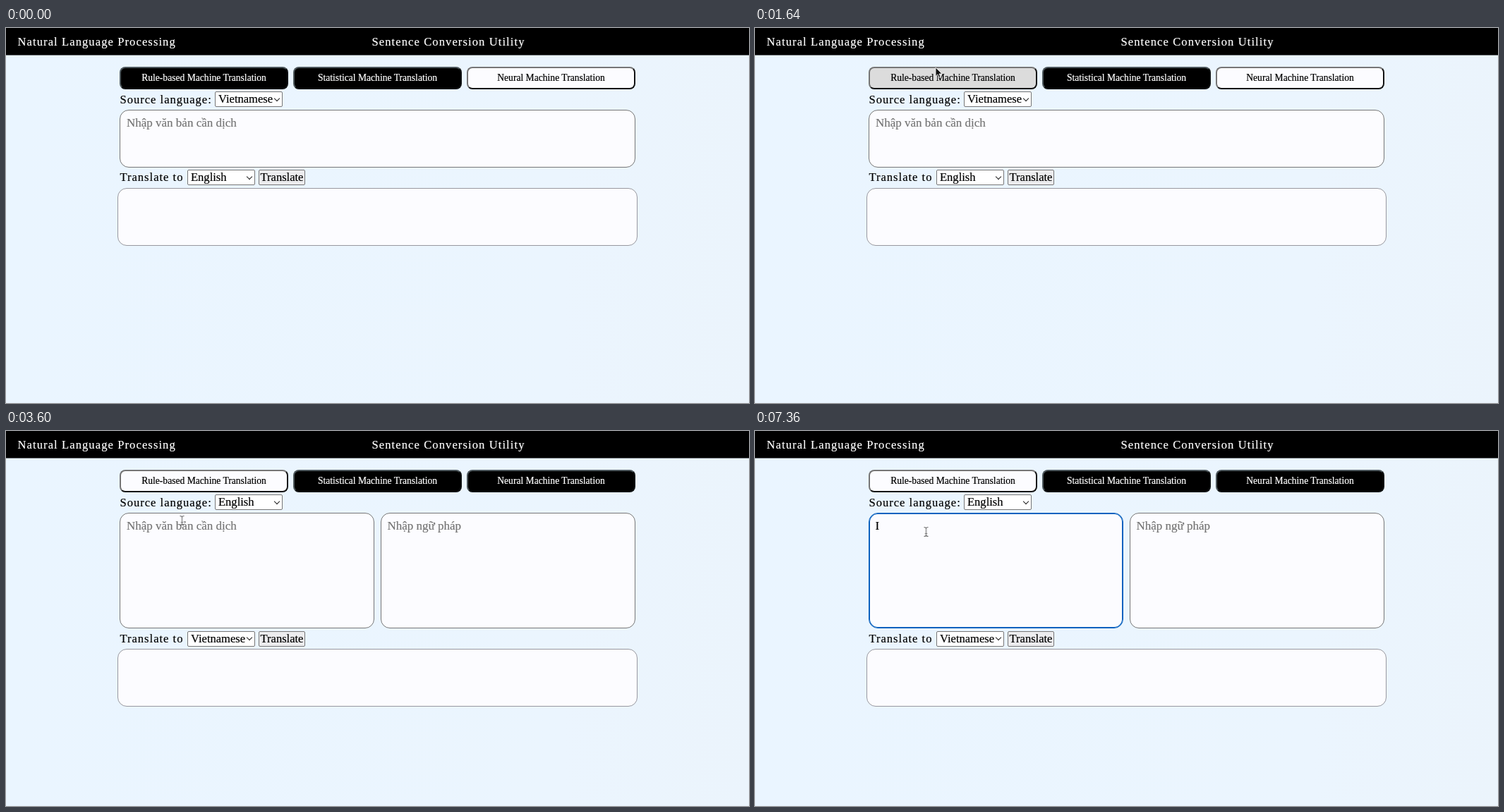
These frames come from a looping animation (1053 by 532 pixels, 8 s). An HTML page:

```html
<!DOCTYPE html>
<html lang="en">
<head>
<meta charset="utf-8">
<title>Translation page</title>
<style>
  html, body { margin: 0; width: 100%; height: 100%; overflow: hidden; }
  body {
    position: relative;
    background: linear-gradient(90deg, #eaf5ff, #ebf5fe 75%, #ebf4fc);
    font: 16.55px/22px "Liberation Serif", serif;
    color: #000;
    -webkit-text-stroke: .2px;
  }
  body *, svg { box-sizing: border-box; white-space: pre; }
  header, .tab, .label, .select, .button, .area, .output, .caret, .typed, .cursor { position: absolute; }
  .view { position: absolute; inset: 0; }

  header {
    left: 0; top: 0; width: 100%; height: 39px;
    border-bottom: 1px solid #6c7074;
    background: #000; color: #fff; letter-spacing: 1.1px;
  }
  header span { position: absolute; top: 8.5px; }

  .tab {
    --lit: #4c565b; --shade: #101213;
    top: 55px; width: 239px; height: 32px;
    border: 2px solid; border-color: var(--lit) var(--shade) var(--shade) var(--lit); border-radius: 8px;
    background: #000; color: #fff;
    font-size: 13.6px; line-height: 28px; text-align: center;
  }

  .label { left: 161.5px; letter-spacing: 1px; }
  .select, .button { height: 22px; border: 1px solid #767676; border-radius: 2px; line-height: 20px; }
  .select { width: 96px; padding-left: 4px; background: #fff; }
  .select::after {
    content: ""; position: absolute; right: 4px; top: 5.5px; width: 5px; height: 5px;
    border: solid #222; border-width: 0 1.2px 1.2px 0; transform: rotate(45deg);
  }
  .source { left: 296px; top: 90px; }
  .goal { left: 257px; }
  .button { left: 358px; width: 66px; background: #ececee; text-align: center; }

  .area, .output { border: 1px solid #767676; border-radius: 13px; background: #fcfcff; }
  .area { left: 161px; top: 115.5px; width: 731px; height: 82px; padding: 7px 9px; color: #757575; font-size: 17px; }
  .half { width: 361px; height: 164px; }
  .right { left: 530.5px; }
  .output { left: 158px; width: 737px; height: 82px; border-color: #98989f; }

  .neural .low { top: 201px; }
  .neural .output { top: 226.5px; }
  .rule .low { top: 283.5px; }
  .rule .output { top: 309px; }

  .typed { left: 170.5px; top: 123.5px; font-size: 17px; }
  .caret { left: 0; top: 124px; width: 1px; height: 20px; background: #000; }
  .cursor { left: 0; top: 0; width: 1px; height: 1px; overflow: visible; }

  .neural, .rule, .first, .third, .focusable, .hint, .typed, .caret, .cursor, .arrow, .beam {
    animation: 8s step-end infinite;
  }
  .neural { animation-name: leave; }
  .rule { animation-name: enter; }
  .first { animation-name: choose; }
  .third { animation-name: release; }
  .focusable { animation-name: focus; }
  .hint { animation-name: hint; }
  .typed { animation-name: typed; }
  .caret { animation-name: caret; }
  .cursor { animation-name: move; }
  .arrow { animation-name: arrow; }
  .beam { animation-name: beam; }

  @keyframes leave { 0% { visibility: visible } 32.75%, 100% { visibility: hidden } }
  @keyframes enter { 0% { visibility: hidden } 32.75%, 100% { visibility: visible } }
  @keyframes choose {
    0% { background: #000; color: #fff; --lit: #4c565b; --shade: #101213 }
    20.5% { background: #dcdcdc; color: #000; --lit: #767676; --shade: #141414 }
    29.5% { background: #dcdcdc; color: #000; --lit: #141414; --shade: #767676 }
    32.75%, 100% { background: #fcfcff; color: #000; --lit: #767676; --shade: #141414 }
  }
  @keyframes release {
    0% { background: #fcfcff; color: #000; --lit: #767676; --shade: #141414 }
    32.75%, 100% { background: #000; color: #fff; --lit: #4c565b; --shade: #101213 }
  }
  @keyframes focus {
    0% { border-color: #767676; box-shadow: none }
    50.5%, 100% { border-color: #0b62bf; box-shadow: inset 0 0 0 1px #0b62bf }
  }
  @keyframes hint { 0% { opacity: 1 } 69.5%, 100% { opacity: 0 } }
  @keyframes typed { 0% { opacity: 0 } 69.5%, 100% { opacity: 1 } }
  @keyframes caret {
    0% { opacity: 0; transform: translateX(171px) }
    50.5% { opacity: 1; transform: translateX(171px) }
    67.75% { opacity: 0; transform: translateX(171px) }
    69.5% { opacity: 1; transform: translateX(177px) }
    74.5% { opacity: 1; transform: translateX(181px) }
    92%, 100% { opacity: 0; transform: translateX(181px) }
  }
  @keyframes move {
    0% { transform: translate(295px, -40px) }
    11.75% { transform: translate(289px, -14px) }
    17.25% { transform: translate(283px, 2px) }
    18.75% { transform: translate(270px, 24px) }
    20.5% { transform: translate(256px, 56px) }
    21.5% { transform: translate(248px, 62px) }
    22.25% { transform: translate(244px, 65px) }
    25.5% { transform: translate(243px, 65px) }
    39.5% { transform: translate(244px, 68px) }
    40.5% { transform: translate(245px, 74px) }
    41.5% { transform: translate(246px, 83px) }
    42.5% { transform: translate(247px, 94px) }
    43.25% { transform: translate(248px, 103px) }
    44% { transform: translate(249px, 115px) }
    45% { transform: translate(249.5px, 127px) }
    46.5% { transform: translate(247px, 133px) }
    47.5% { transform: translate(244px, 139px) }
    48.75%, 100% { transform: translate(242.5px, 143px) }
  }
  @keyframes arrow { 0% { opacity: 1 } 42.5%, 100% { opacity: 0 } }
  @keyframes beam { 0% { opacity: 0 } 42.5%, 100% { opacity: 1 } }
</style>
</head>
<body>
  <header>
    <span style="left:16.5px">Natural Language Processing</span>
    <span style="left:518.5px">Sentence Conversion Utility</span>
  </header>

  <div class="tab first" style="left:161px">Rule-based Machine Translation</div>
  <div class="tab" style="left:407px">Statistical Machine Translation</div>
  <div class="tab third" style="left:653px">Neural Machine Translation</div>
  <div class="label" style="top:90.5px">Source language:</div>

  <div class="view neural">
    <div class="select source">Vietnamese</div>
    <div class="area">Nhập văn bản cần dịch</div>
    <div class="label low">Translate to</div>
    <div class="select goal low">English</div>
    <div class="button low">Translate</div>
    <div class="output"></div>
  </div>

  <div class="view rule">
    <div class="select source">English</div>
    <div class="area half focusable"><span class="hint">Nhập văn bản cần dịch</span></div>
    <div class="area half right">Nhập ngữ pháp</div>
    <div class="label low">Translate to</div>
    <div class="select goal low">Vietnamese</div>
    <div class="button low">Translate</div>
    <div class="output"></div>
    <div class="typed">I</div>
    <div class="caret"></div>
  </div>

  <svg class="cursor">
    <path class="arrow" d="M0 0V12.5L2.9 9.8L4.8 14.2L7 13.3L5.1 9H9Z" fill="#111" stroke="#eee" stroke-width=".9"/>
    <path class="beam" d="M-3-6.5Q0-6.5 0-4.5Q0-6.5 3-6.5M0-4.5V4.5M-3 6.5Q0 6.5 0 4.5Q0 6.5 3 6.5M-1.5 2.5H1.5" fill="none" stroke="#666" stroke-width="1.1"/>
  </svg>
</body>
</html>
```
